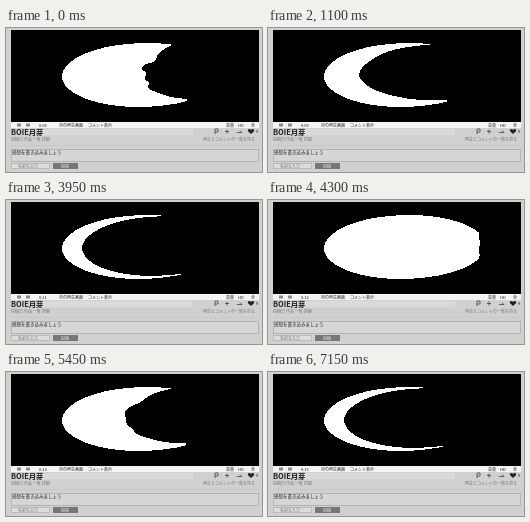
An HTML page for the animation above (7200 ms loop, 256 by 144 pixels).

```html
<!DOCTYPE html>
<html lang="ja">
<head>
<meta charset="utf-8">
<title>Moon player</title>
<style>
html, body { margin: 0; width: 100%; height: 100%; overflow: hidden; background: #d0d0d0; }
svg { display: block; width: 100vw; height: 100vh; }
text { font-family: "Noto Sans CJK JP", "Noto Sans CJK", "Noto Sans", sans-serif; fill: #222; }
.tiny { font-size: 4px; }
.soft { fill: #777; }
</style>
</head>
<body>
<svg viewBox="0 0 256 144" preserveAspectRatio="none">
  <rect width="256" height="144" fill="#d0d0d0"/>
  <rect x="5" y="2" width="248" height="92" fill="#000"/>
  <g shape-rendering="crispEdges">
    <ellipse cx="137" cy="47" rx="81" ry="32" fill="#fff" transform="rotate(-1.2 137 47)"/>
    <path id="shadow" fill="#000"/>
  </g>

  <rect x="5" y="94" width="248" height="6" fill="#f4f4f4"/>
  <path d="M12 95.5v3M14 95.5v3M21 95.5v3M23 95.5v3" stroke="#222" fill="none"/>
  <g class="tiny">
    <text id="clock" x="33" y="98.6"></text>
    <text x="53" y="98.6">月の再生画面</text>
    <text x="82" y="98.6">コメント表示</text>
    <text x="220" y="98.6">音量</text>
    <text x="232" y="98.6">HD</text>
    <text x="245" y="98.6">全</text>
  </g>

  <rect x="36" y="101" width="151" height="6.5" fill="#dadada"/>
  <text x="5" y="107" font-size="7.4" font-weight="700">BOIE月芽</text>
  <g fill="none" stroke="#444" stroke-width=".8">
    <path d="M209 106v-5h3v3h-3M219 103.5h4M221 101.5v4M231 104.5h5l-2-2"/>
  </g>
  <path d="M245 106l-3.2-3q-.4-2 1.5-2.1 1.1 0 1.7 1 .6-1 1.7-1 1.9.1 1.5 2.1z" fill="#222"/>
  <text class="tiny" x="250" y="105">9</text>
  <text class="tiny soft" x="5" y="112.6">投稿日 作品 一覧 詳細</text>
  <text class="tiny soft" x="197" y="112.6">再生とコメントの一覧を見る</text>
  <path d="M5 117.5h248" stroke="#c3c3c3" stroke-width=".6"/>

  <rect x="5.5" y="121.5" width="247" height="12" fill="#d6d6d6" stroke="#a9a9a9" stroke-width=".7"/>
  <text x="6" y="125.5" font-size="4.5">感想を書き込みましょう</text>
  <rect x="5.5" y="135.5" width="38" height="5" fill="#dcdcdc" stroke="#aaa" stroke-width=".6"/>
  <text class="tiny soft" x="12" y="139.5">名前を入力</text>
  <rect x="47" y="135" width="25" height="6" fill="#777"/>
  <text class="tiny" x="55" y="139.5" style="fill:#eee">投稿</text>
</svg>
<script>
const LOOP = 7200, STEP = 50, CYCLE = 5000, RISE = 4250;
const shadow = document.getElementById('shadow');
const clock = document.getElementById('clock');

// Left edge of the shadow from the upper tip to the lower tip.
const clear = [[218,14],[218,20],[218,25],[218,30],[218,35],[218,40],[218,45],
  [218,50],[218,55],[218,60],[218,66],[218,71],[218,76]];
const wings = [[176,15],[175,19],[160,24],[153,31],[147,38],[153,41],[154,45],
  [151,49],[154,54],[150,59],[155,63],[167,67],[186,69]];
const profile = [[169,16],[160,20],[152,26],[149,33],[138,37],[136,41],[140,45],
  [139,51],[143,55],[142,60],[150,64],[165,69],[181,71]];
const crescent = [[168,16],[148,18],[129,21],[114,26],[102,33],[94,40],[91,47],
  [94,53],[103,60],[115,65],[131,69],[152,72],[179,72]];
const sliver = [[168,16],[142,17],[120,20],[102,25],[88,32],[79,40],[76,48],
  [79,56],[88,64],[102,70],[120,74],[145,76],[175,74]];

const keys = [[-750, clear], [-250, wings], [0, profile], [1100, crescent], [1500, sliver]];

function edgeAt(time) {
  const next = keys.findIndex(key => key[0] > time);
  if (next < 0) return sliver;
  const [start, from] = keys[next - 1], [end, to] = keys[next];
  const mix = (time - start) / (end - start);
  return from.map((p, i) => p.map((v, axis) => v + (to[i][axis] - v) * mix));
}

function smooth(points) {
  let path = '';
  for (let i = 0; i < points.length - 1; i++) {
    const a = points[Math.max(0, i - 1)], b = points[i], c = points[i + 1];
    const d = points[Math.min(points.length - 1, i + 2)];
    const first = b.map((v, k) => v + (c[k] - a[k]) / 6);
    const second = c.map((v, k) => v - (d[k] - b[k]) / 6);
    path += `C${first} ${second} ${c}`;
  }
  return path;
}

function draw(now) {
  const time = Math.floor(now % LOOP / STEP) * STEP;
  const phase = time >= RISE ? time - CYCLE : time;
  const edge = edgeAt(phase);
  const top = edge[0], bottom = edge[edge.length - 1];
  shadow.setAttribute('d',
    `M252 3H${top[0]}V${top[1]}${smooth(edge)}L${bottom[0]} 90H252Z`);
  clock.textContent = '0:' + String(8 + Math.floor(time / 1000)).padStart(2, '0');
  requestAnimationFrame(tick);
}

const began = performance.now();
function tick() { draw(performance.now() - began); }
tick();
</script>
</body>
</html>
```
